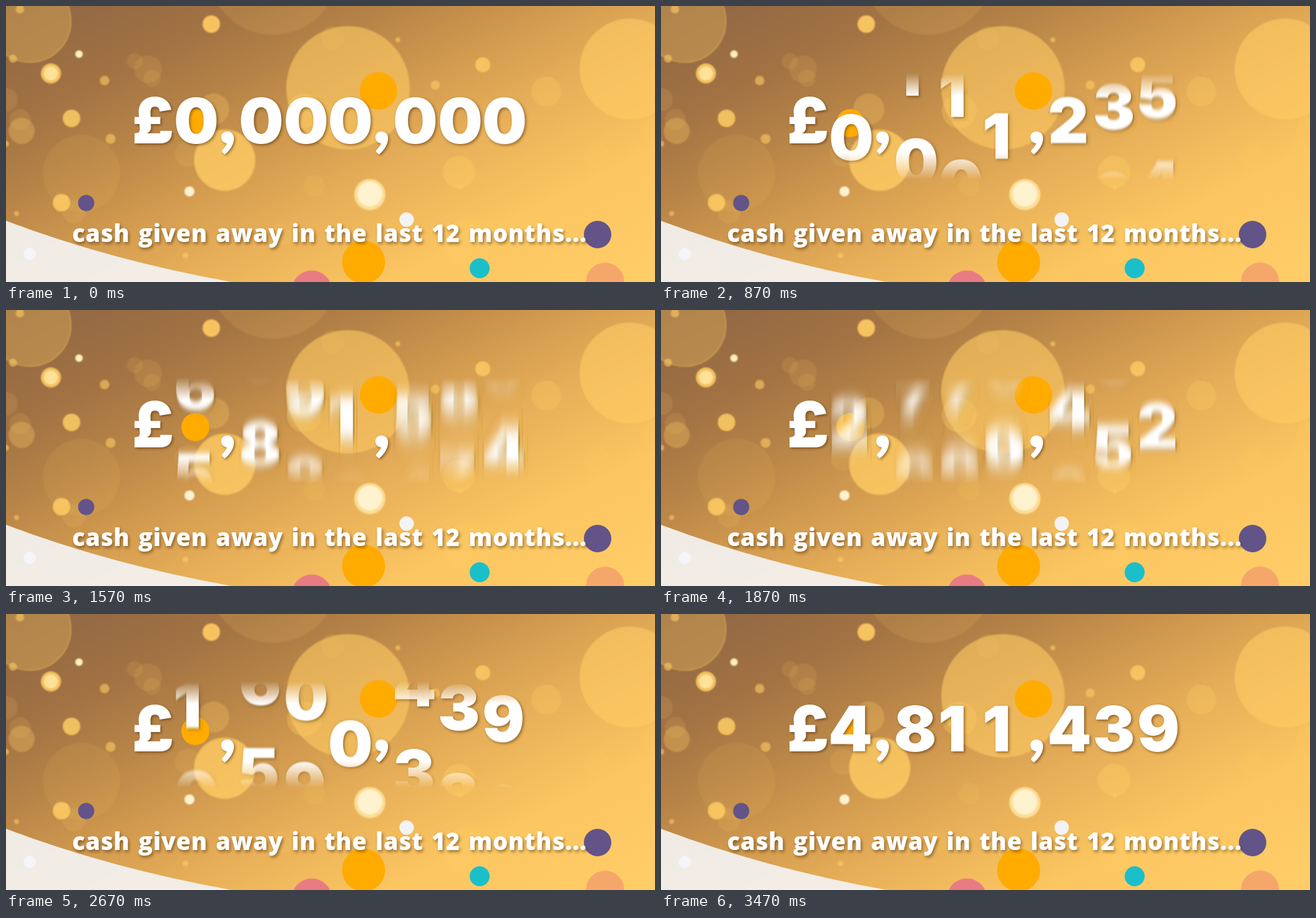
An HTML page with a canvas that plays this animation: 1040x442 px, repeating every 4.06 s.

```html
<!DOCTYPE html>
<html lang="en">
<head>
<meta charset="utf-8">
<title>Prize counter</title>
<style>
  html, body { margin: 0; width: 100%; height: 100%; overflow: hidden; background: #d9a155; }
  canvas { display: block; width: 1040px; height: 442px; }
</style>
</head>
<body>
<canvas id="stage" width="1040" height="442"></canvas>
<script>
const W = 1040, H = 442, LOOP = 4060, FPS = 30;
const BIG = '900 101px Inter, "Open Sans", sans-serif';
const COMMA = '900 118px Lato, "Noto Serif", serif';
const LINE = '800 38px "Open Sans", "Noto Sans", sans-serif';
const BASE = 220;

function layer(w, h) {
  const c = document.createElement('canvas');
  c.width = w;
  c.height = h;
  return c.getContext('2d');
}

function disc(g, x, y, r, fill) {
  g.fillStyle = fill;
  g.beginPath();
  g.arc(x, y, r, 0, 7);
  g.fill();
}

function ramp(g, x, y, stops) {
  const paint = g.createLinearGradient(0, 0, x, y);
  stops.forEach(([at, colour]) => paint.addColorStop(at, colour));
  return paint;
}

function shadow(g, dx, dy, blur) {
  g.shadowColor = 'rgba(60,30,0,.5)';
  g.shadowOffsetX = dx;
  g.shadowOffsetY = dy;
  g.shadowBlur = blur;
}

// Draws text so that its ink, not its advance box, starts at x.
function inkText(g, text, x, y, font) {
  g.font = font;
  g.fillStyle = '#fff';
  g.fillText(text, x + g.measureText(text).actualBoundingBoxLeft, y);
}

function seeded(seed) {
  return () => (seed = (seed * 16807) % 2147483647) / 2147483647;
}

// ---- backdrop ----
const gold = a => `rgba(255,204,100,${a})`;

// The large lights: x, y, radius, opacity
const LIGHTS = [
  [38, 24, 66, .3], [548, 131, 98, .6], [1000, 101, 80, .62], [350.5, 247, 48.5, .8],
  [121, 268, 62, .1], [428, -60, 106, .14], [726, 266, 26, .4], [740, 380, 39, .35],
  [866, 137, 24, .3], [333, 165, 25, .28], [478, 168, 28, .35], [25, 200, 21, .32],
  [329, 29, 14, .9], [105, 180, 14, .85], [89, 315, 14, .85], [764, 94, 12, .8]
];

function scatter(g, count, seed, size, alpha) {
  const rnd = seeded(seed);
  for (let i = 0; i < count; i++) {
    const x = W * rnd() ** 1.5, y = H * rnd();
    disc(g, x, y, size * (.4 + .6 * rnd()), gold(alpha));
  }
}

function drawLights(g) {
  g.filter = 'blur(1.2px)';
  scatter(g, 14, 71, 24, .13);
  scatter(g, 12, 19, 8, .6);
  for (const [x, y, r, a] of LIGHTS) {
    disc(g, x, y, r, gold(a));
    if (r < 48 || a < .3) continue;
    g.lineWidth = 2;
    g.strokeStyle = gold(.4);
    g.stroke();
  }
  disc(g, 72, 108, 16, gold(.9));
  disc(g, 72, 108, 11, '#ffe29a');
  disc(g, 583, 302, 25, 'rgba(255,228,160,.85)');
  disc(g, 583, 301, 20, '#fff3cf');
  disc(g, 294, 297, 8, '#fff3cf');
  disc(g, 117, 77, 6, '#fff0bd');
  g.filter = 'none';
}

function drawDots(g) {
  disc(g, 597, 136, 30, '#ffab00');
  disc(g, 303.5, 187.5, 22.5, '#ffab00');
  disc(g, 573, 410, 34.5, '#ffab00');
  disc(g, 128.5, 315.5, 13, '#625489');
  disc(g, 948, 366, 22, '#625489');
  disc(g, 759, 420, 16, '#1bbfca');
  disc(g, 642, 342, 11.5, '#f3f3f5');
  disc(g, 38, 397, 10, '#f5f5fa');
  disc(g, 490, 456, 32.4, '#e97c82');
  disc(g, 960, 441.5, 30.5, '#f4a66b');
}

function drawBackdrop(g) {
  g.fillStyle = ramp(g, 384, 768, [
    [0, '#8d6544'], [.2, '#a27243'], [.32, '#b58347'], [.45, '#cf984e'],
    [.59, '#e6ae58'], [.78, '#fcc661'], [1, '#ffcd68']
  ]);
  g.fillRect(0, 0, W, H);
  drawLights(g);

  g.fillStyle = 'rgba(245,243,241,.93)';
  g.beginPath();
  g.moveTo(0, 344);
  g.quadraticCurveTo(170, 408, 362, H);
  g.lineTo(0, H);
  g.fill();
  drawDots(g);
}

function drawCaption(g) {
  const text = 'cash given away in the last 12 months...';
  g.save();
  shadow(g, 2, 3, 5);
  g.font = LINE;
  g.wordSpacing = '3px';
  const gap = (825 - g.measureText(text).width) / text.length;
  g.letterSpacing = gap.toFixed(2) + 'px';
  inkText(g, text, 107, 378, LINE);
  g.restore();
}

const scene = layer(W, H);
drawBackdrop(scene);
drawCaption(scene);
shadow(scene, 2, 2, 4);
inkText(scene, '£', 205, BASE, BIG);
inkText(scene, ',', 344, BASE, COMMA);
inkText(scene, ',', 591, BASE, COMMA);

// ---- rolling digits ----
const AMOUNT = [...'4811439'].map(Number);
const TOP = 106, BAND = 174, CELL = 96, PAD = 10, RISE = 95, PITCH = 142;
const ROLL = 3000, FIRST = -68, STAGGER = 100, TURNS = 3;

const glyphs = [...'0123456789'].map(d => {
  const g = layer(CELL, 120);
  shadow(g, 2, 2, 4);
  inkText(g, d, PAD, RISE, BIG);
  return g.canvas;
});

const reel = layer(CELL, BAND);
const fade = ramp(reel, 0, BAND, [
  [.01, 'rgba(0,0,0,0)'], [.22, '#000'], [.74, '#000'], [.99, 'rgba(0,0,0,0)']
]);

// Cubic in and out; the smear follows the square of its speed.
const ease = u => u < .5 ? 4 * u ** 3 : 1 - 4 * (1 - u) ** 3;
const smear = u => 330 * Math.min(u, 1 - u) ** 4;

// Offsets and weights of a vertical Gaussian blur
function gaussian(sd) {
  if (sd < .3) return [[0, 1]];
  const step = Math.min(.5, 2 / sd), taps = [];
  for (let k = -2.5; k <= 2.5; k += step) taps.push([k * sd, Math.exp(-k * k / 2)]);
  const sum = taps.reduce((s, tap) => s + tap[1], 0);
  return taps.map(([dy, w]) => [dy, w / sum]);
}

function drawReel(g, digit, i, t) {
  const start = FIRST + STAGGER * (AMOUNT.length - 1 - i);
  const u = Math.min(1, Math.max(0, (t - start) / ROLL));
  const pos = ease(u) * (TURNS * 10 + digit);
  const taps = gaussian(smear(u));

  reel.clearRect(0, 0, CELL, BAND);
  reel.globalCompositeOperation = 'lighter';
  for (let n = Math.max(0, Math.floor(pos) - 1); n <= pos + 2; n++) {
    const y = BASE - RISE - TOP + (pos - n) * PITCH;
    for (const [dy, weight] of taps) {
      reel.globalAlpha = weight;
      reel.drawImage(glyphs[n % 10], 0, y + dy);
    }
  }
  reel.globalAlpha = 1;
  reel.globalCompositeOperation = 'destination-in';
  reel.fillStyle = fade;
  reel.fillRect(0, 0, CELL, BAND);
  reel.globalCompositeOperation = 'source-over';

  const commas = (i > 0) + (i > 3);
  g.drawImage(reel.canvas, Math.round(272 + 71.6 * i + 32.3 * commas) - PAD, TOP);
}

const stage = document.getElementById('stage').getContext('2d');

function draw(ms) {
  const t = Math.floor((ms % LOOP + 4) * FPS / 1000) * 1000 / FPS;
  stage.drawImage(scene.canvas, 0, 0);
  AMOUNT.forEach((digit, i) => drawReel(stage, digit, i, t));
}

const began = performance.now();
function tick() {
  draw(performance.now() - began);
  requestAnimationFrame(tick);
}
tick();
</script>
</body>
</html>
```
